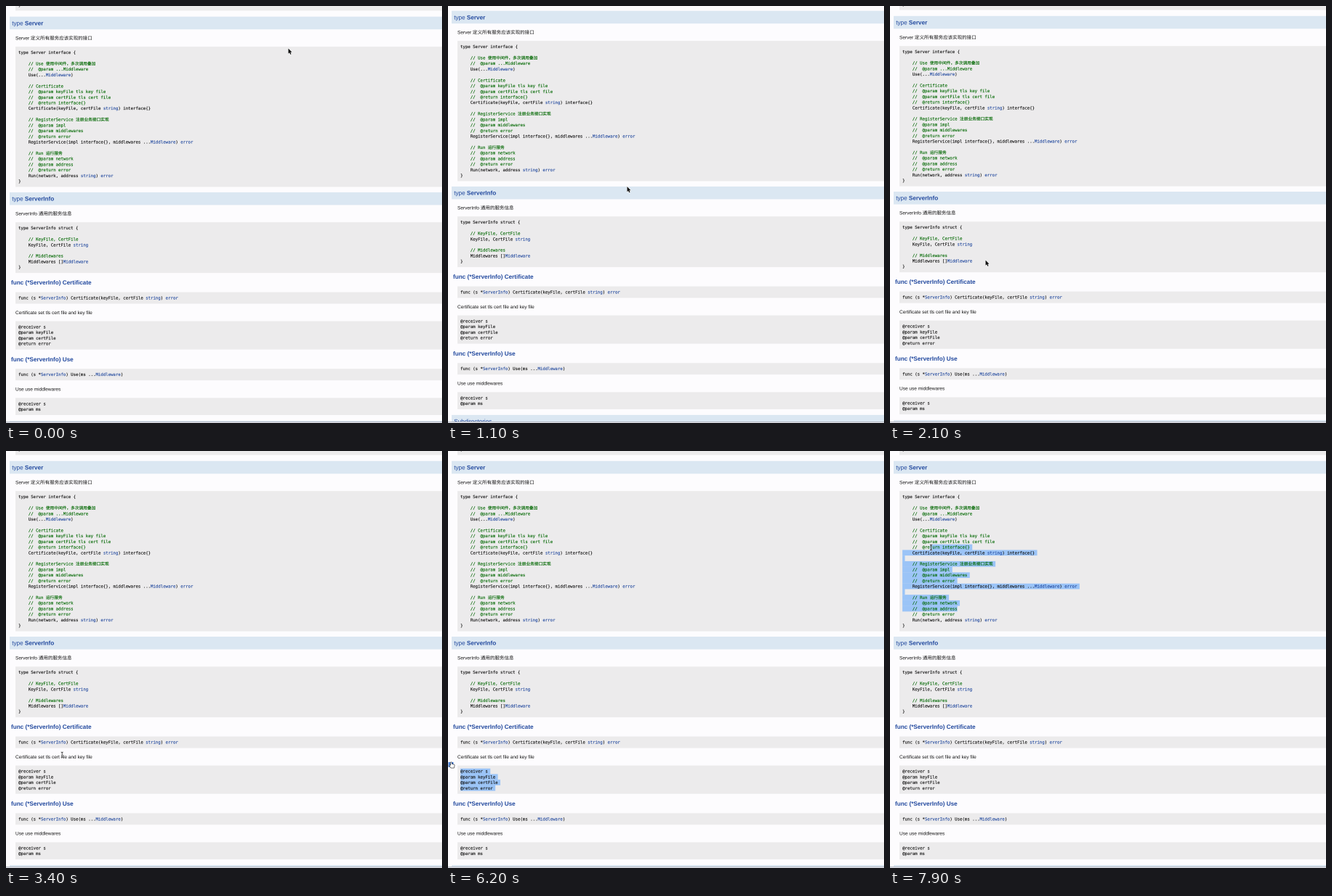
Recreate the animation shown at these times as an HTML page with a canvas. Size 600 by 575 pixels, loop 8 s.

```html
<!DOCTYPE html>
<html lang="zh">
<head>
<meta charset="utf-8">
<style>
  html, body { margin: 0; width: 100%; height: 100%; overflow: hidden; background: #fdfcfe; }
  canvas { display: block; width: 600px; height: 575px; }
</style>
</head>
<body>
<canvas id="stage" width="1200" height="1150"></canvas>
<script>
const ctx = document.getElementById('stage').getContext('2d');
const LOOP = 8000, STEP = 100;
const DENSITY = 2; // supersampling, so that text can sit between pixels
const PAD = 4.08, LINE = 7.717, LEFT = 13;

const SANS = '"Liberation Sans", "Noto Sans CJK SC", "Noto Sans CJK", sans-serif';
const CODE_FONT = '5.717px "DejaVu Sans Mono", "Noto Sans CJK SC", "Noto Sans CJK", monospace';
const TEXT_FONT = `6.533px ${SANS}`;
const HEAD_FONT = `8.167px ${SANS}`;
const BOLD_FONT = `bold ${HEAD_FONT}`;

const INK = '#141414', BLUE = '#234a9f', GREEN = '#006800', BAR = '#dbe7f2', BOX = '#ecebec', SELECTED = '#9bc4f7';

const serverCode = `type Server interface {

    // Use 使用中间件，多次调用叠加
    //  @param ...Middleware
    Use(...Middleware)

    // Certificate
    //  @param keyFile tls key file
    //  @param certFile tls cert file
    //  @return interface{}
    Certificate(keyFile, certFile string) interface{}

    // RegisterService 注册业务接口实现
    //  @param impl
    //  @param middlewares
    //  @return error
    RegisterService(impl interface{}, middlewares ...Middleware) error

    // Run 运行服务
    //  @param network
    //  @param address
    //  @return error
    Run(network, address string) error
}`;

const infoCode = `type ServerInfo struct {

    // KeyFile, CertFile
    KeyFile, CertFile string

    // Middlewares
    Middlewares []Middleware
}`;

const block = (top, code) => ({ top, lines: code.split('\n') });
const server = block(56.1, serverCode);
const receiver = block(434.6, '@receiver s\n@param keyFile\n@param certFile\n@return error');
const blocks = [
  block(-9.5, '}'),
  server,
  block(298.2, infoCode),
  block(394.6, 'func (s *ServerInfo) Certificate(keyFile, certFile string) error'),
  receiver,
  block(500.3, 'func (s *ServerInfo) Use(ms ...Middleware)'),
  block(540.4, '@receiver s\n@param ms'),
];
const bars = [[14.7, 'type ', 'Server'], [256.9, 'type ', 'ServerInfo'], [571.9, 'Subdirectories', '']];
const methods = [[384.1, 'func (*ServerInfo) Certificate'], [489.8, 'func (*ServerInfo) Use']];
const paragraphs = [
  [46.3, 'Server 定义所有服务应该实现的接口'],
  [288.5, 'ServerInfo 通用的服务信息'],
  [424.8, 'Certificate set tls cert file and key file'],
  [530.5, 'Use use middlewares'],
];

// Motion keys: time, then values
const scrollKeys = [[900, 0], [1000, -5], [1100, -8], [1200, -6.8], [1300, -4.9], [1500, -2.5], [1800, -0.9]];
const pointerKeys = [
  [0, 388.5, 58.5], [300, 352, 112], [700, 262, 232], [900, 246.5, 249], [1400, 246.5, 249],
  [1800, 215, 283], [2100, 131.5, 350.5], [2400, 128, 362], [2700, 100, 405], [3200, 76.5, 418.5],
  [3500, 77.5, 419], [4100, 77.5, 419], [4500, 137.5, 351], [4600, 158, 341], [4700, 158, 341],
  [5200, 64, 465], [5600, 64, 465], [6000, 15, 440], [6200, 5, 428.8], [6300, 5, 428.8],
  [6500, 38, 428], [6600, 38, 428], [6900, 122, 190], [7000, 122, 190], [7300, 107, 217],
  [7400, 107, 217], [7900, 56.5, 133],
];
const pointerKinds = [[0, 'arrow'], [2800, 'beam'], [4200, 'arrow'], [5100, 'beam'], [6100, 'hand'],
  [6400, 'arrow'], [6800, 'beam']];
const drags = [
  { target: receiver, start: 5700, end: 6000, clear: 6400, line: 3, col: 14 },
  { target: server, start: 7500, end: 7900, clear: LOOP, line: 20, col: 22 },
];

function valueAt(keys, time) {
  const next = keys.findIndex(key => key[0] > time);
  if (next < 0) return keys[keys.length - 1].slice(1);
  if (next === 0) return keys[0].slice(1);
  const a = keys[next - 1], b = keys[next], u = (time - a[0]) / (b[0] - a[0]);
  return a.slice(1).map((v, i) => v + (b[i + 1] - v) * u);
}

function write(text, x, y, font, color) {
  ctx.font = font;
  ctx.fillStyle = ctx.strokeStyle = color;
  ctx.fillText(text, x, y);
  if (font === CODE_FONT) {
    // Slightly heavier small type
    ctx.lineWidth = 0.15;
    ctx.strokeText(text, x, y);
  }
  return x + ctx.measureText(text).width;
}

function rect(x, y, w, h, color) {
  ctx.fillStyle = color;
  ctx.fillRect(x, y, w, h);
}

function widthOf(text) {
  ctx.font = CODE_FONT;
  return ctx.measureText(text).width;
}

function drawSelection(drag, time, scroll) {
  const { target, line: lastLine, col: lastCol } = drag;
  const [x, y] = valueAt(pointerKeys, Math.min(time, drag.end));
  const top = target.top + PAD, left = LEFT + PAD;
  const firstLine = Math.max(0, Math.min(lastLine, Math.floor((y - scroll - top) / LINE)));
  const firstCol = Math.max(0, Math.round((x - left) / widthOf(' ')));
  for (let i = firstLine; i <= lastLine; i++) {
    const text = target.lines[i] + ' ';
    const from = i === firstLine ? widthOf(text.slice(0, firstCol)) : 0;
    const to = widthOf(i === lastLine ? text.slice(0, lastCol) : text);
    if (to > from) rect(left + from, top + i * LINE, to - from, LINE, SELECTED);
  }
}

function drawCodeLine(text, x, y) {
  if (/^\s*\/\//.test(text)) return write(text, x, y, CODE_FONT, GREEN);
  if (text.startsWith('@')) return write(text, x, y, CODE_FONT, INK);
  text.split(/(\bMiddleware\b|\bstring\b|\berror\b|(?<=\*)ServerInfo)/).forEach((part, i) => {
    x = write(part, x, y, CODE_FONT, i % 2 ? BLUE : INK);
  });
}

function drawPage(time, scroll) {
  for (const [top, plain, bold] of bars) {
    rect(5, top, 595, 17.5, BAR);
    write(bold, write(plain, 8.2, top + 11.6, HEAD_FONT, BLUE), top + 11.6, BOLD_FONT, BLUE);
  }
  for (const { top, lines } of blocks) rect(LEFT, top, 587, lines.length * LINE + 2 * PAD, BOX);
  for (const drag of drags) {
    if (time >= drag.start && time < drag.clear) drawSelection(drag, time, scroll);
  }
  if (time >= 3800 && time < 4800) rect(LEFT, 418.4, 106.2, 8.4, SELECTED);
  for (const { top, lines } of blocks) {
    lines.forEach((text, i) => drawCodeLine(text, LEFT + PAD, top + PAD + i * LINE + 5.84));
  }
  for (const [y, text] of methods) write(text, 7, y, BOLD_FONT, BLUE);
  for (const [y, text] of paragraphs) write(text, LEFT, y, TEXT_FONT, INK);
}

const arrowPath = new Path2D('M0 0V7.2L1.6 5.7L2.8 8.4L4.1 7.8L2.9 5.2H5.1Z');
const beamPath = new Path2D('M-1.5 -3.7Q0 -3.7 0 -2.7Q0 -3.7 1.5 -3.7M0 -3V3M-1.5 3.7Q0 3.7 0 2.7Q0 3.7 1.5 3.7');
const handPath = new Path2D('M-1.2 4.4V.8Q-.6 -.2 0 .8V3L3 3.6Q4 4 3.7 5.6L3 8H-.8L-3 5.2Q-2.8 4 -1.2 5Z');

function outline(path, color, width) {
  ctx.strokeStyle = color;
  ctx.lineWidth = width;
  ctx.stroke(path);
}

function drawPointer(time) {
  const [x, y] = valueAt(pointerKeys, time);
  const kind = pointerKinds.filter(([from]) => from <= time).pop()[1];
  ctx.save();
  ctx.translate(x, y);
  if (kind === 'beam') {
    outline(beamPath, 'rgba(255,255,255,.7)', 1.8);
    outline(beamPath, '#222', 0.8);
  } else {
    const path = kind === 'hand' ? handPath : arrowPath;
    outline(path, kind === 'hand' ? '#222' : '#fff', 1.2);
    ctx.fillStyle = kind === 'hand' ? '#fff' : '#111';
    ctx.fill(path);
  }
  ctx.restore();
}

function draw(now) {
  const time = Math.floor((now % LOOP) / STEP) * STEP;
  const [scroll] = valueAt(scrollKeys, time);
  ctx.setTransform(DENSITY, 0, 0, DENSITY, 0, 0);
  ctx.textRendering = 'geometricPrecision';
  ctx.lineJoin = 'round';
  rect(0, 0, 600, 575, '#fdfcfe');
  ctx.save();
  ctx.translate(0, scroll);
  drawPage(time, scroll);
  ctx.restore();
  rect(0, 573, 600, 1, '#b4b8c2');
  rect(0, 574, 600, 1, '#e2e3ea');
  if (time >= 4200 && time < 4800) rect(72, 408.5, 7, 7, '#4b82db');
  if (time >= 6100 && time < 6400) rect(0.5, 429, 7, 7, '#4b82db');
  drawPointer(time);
}

const start = performance.now();
function tick() {
  draw(performance.now() - start);
  requestAnimationFrame(tick);
}
tick();
</script>
</body>
</html>
```
